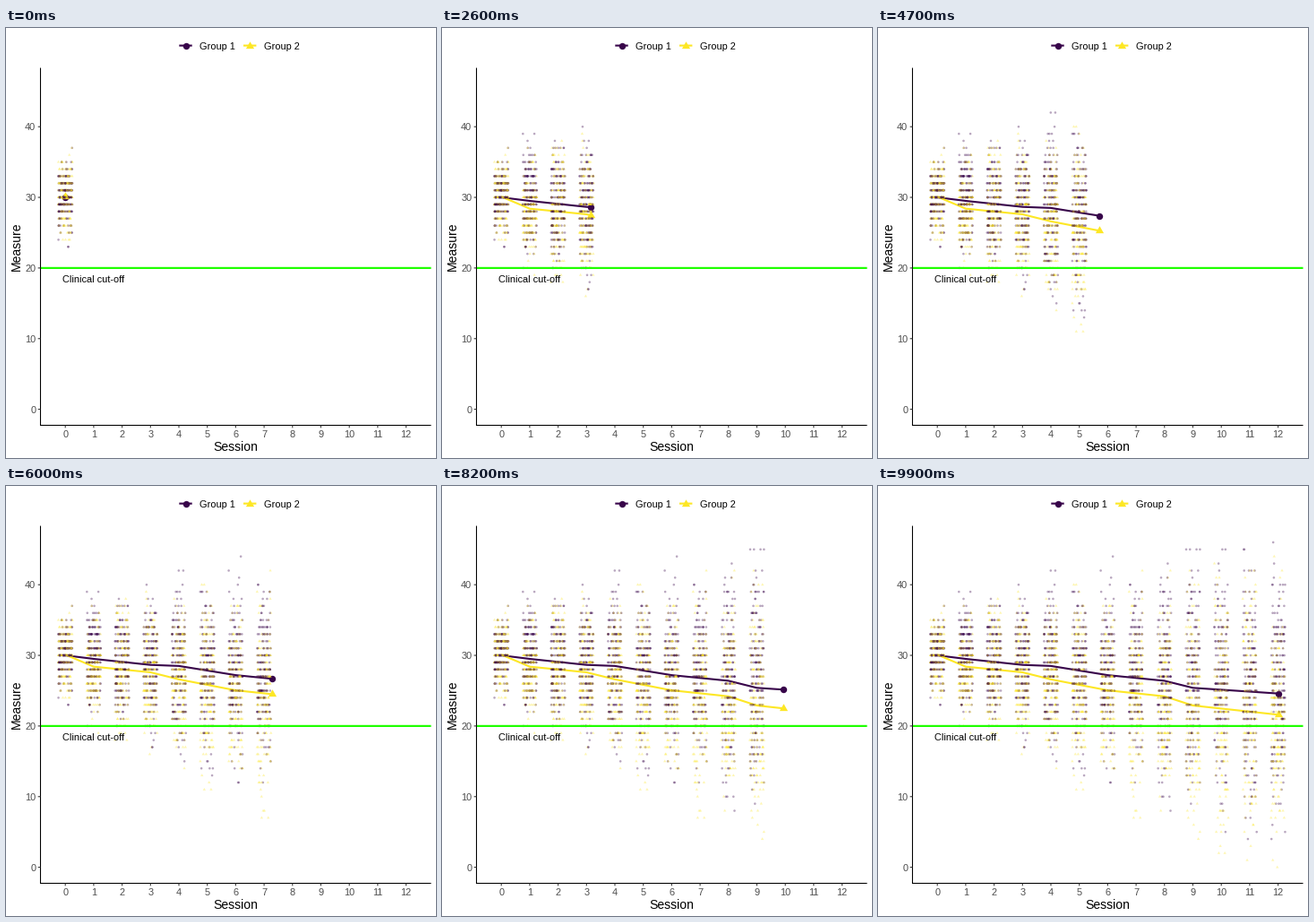
Write a matplotlib script that moves like this. It is 480 px wide and 480 px high and loops after 10000 ms.

```python
import matplotlib.pyplot as plt
import numpy as np
from matplotlib.animation import FuncAnimation
from matplotlib.colors import to_rgba
from matplotlib.path import Path
from matplotlib.transforms import Affine2D

FRAMES, INTERVAL = 100, 100
PEOPLE = 200  # per group
PT = 0.75  # points per pixel at 96 dpi
PURPLE, YELLOW, GREEN = "#38054a", "#fde725", "#1fff00"
INK, GREY = "black", "#4d4d4d"
LEFT, RIGHT, TOP, BOTTOM = 38.5, 474.5, 44.5, 443.5
SESSIONS = np.arange(13)
TRIANGLE = (3, 0, 0)

# Sessions where the trends bend, and the group means there
BENDS = [0, 1, 3, 4, 6, 8, 9, 12]
MEAN1 = [30.0, 29.5, 28.65, 28.5, 27.2, 26.4, 25.4, 24.6]
MEAN2 = [30.1, 28.4, 27.6, 26.6, 25.05, 24.2, 22.9, 21.6]


def px(session):
    return 66.2 + 31.7 * np.asarray(session)


def py(value):
    return 425.6 - 7.885 * np.asarray(value)


fig = plt.figure(figsize=(5, 5), dpi=96, facecolor="white")
ax = fig.add_axes([0, 0, 1, 1])
ax.set(xlim=(0, 480), ylim=(480, 0))
ax.axis("off")


def label(x, y, text, size=11, color=INK, ha="center", **kw):
    ax.text(x, y, text, fontsize=size * PT, color=color, ha=ha, va="baseline",
            family="Liberation Sans", zorder=8, **kw)


def stroke(xs, ys, color=INK, width=1.07, z=6):
    return ax.plot(xs, ys, color=color, lw=width * PT, zorder=z, snap=False,
                   solid_capstyle="butt")[0]


def marker(x, y, shape, color, z=3):
    size = 7.4 if shape == "o" else 10.6
    return ax.plot([x], [y], marker=shape, color=color, ms=size * PT, mew=0,
                   snap=False, zorder=z)[0]


def draw_axes():
    stroke([LEFT, LEFT], [TOP, BOTTOM + 0.5])
    stroke([LEFT - 0.5, RIGHT], [BOTTOM, BOTTOM])
    for v in range(0, 41, 10):
        stroke([LEFT - 2.8, LEFT], [py(v)] * 2, "#333333")
        label(33.4, py(v) + 4, str(v), color=GREY, ha="right")
    for s in SESSIONS:
        stroke([px(s)] * 2, [BOTTOM, BOTTOM + 2.8], "#333333")
        label(px(s), 457.3, str(s), color=GREY)
    label((LEFT + RIGHT) / 2, 471.5, "Session", 14)
    label(15.5, (TOP + BOTTOM) / 2 - 0.5, "Measure", 14, rotation=90,
          rotation_mode="anchor")


def draw_legend():
    keys = [(200.5, "o", PURPLE, "Group 1"), (272.2, TRIANGLE, YELLOW, "Group 2")]
    for x, shape, color, name in keys:
        stroke([x - 7.2, x + 7.2], [19.6, 19.6], color, 2.1)
        marker(x, 19.6, shape, color, 7)
        label(x + 15.6, 24, name, ha="left")


def draw_cutoff():
    stroke([LEFT, RIGHT], [py(20)] * 2, GREEN, 2.2, 5)
    label(98, 284, "Clinical cut-off")


def make_cloud(s, rng):
    """Scores of both groups, interleaved: a dot, then a triangle, and so on."""
    means = [np.interp(s, BENDS, m) for m in (MEAN1, MEAN2)]
    spread = np.sqrt(6.3 + 4.6 * s)
    z = rng.normal(size=(PEOPLE, 2)).clip(-2.8, 2.8)
    values = np.rint(means + spread * z).ravel()
    xs = px(s + rng.uniform(-0.25, 0.25, values.size))
    cloud = ax.scatter(xs, py(values), s=1, linewidths=0, zorder=4)
    shapes = ((Path.unit_circle(), 1.3), (Path.unit_regular_polygon(3), 1.9))
    cloud.set_paths([p.transformed(Affine2D().scale(r * PT)) for p, r in shapes])
    cloud.set_facecolor([to_rgba(c, 0.35) for c in (PURPLE, YELLOW)])
    return cloud


draw_axes()
draw_legend()
draw_cutoff()
rng = np.random.default_rng(12)
clouds = [make_cloud(s, rng) for s in SESSIONS]
trends = [(mean, stroke([], [], color, 2.1, 2), marker(0, 0, shape, color))
          for mean, color, shape in ((MEAN1, PURPLE, "o"), (MEAN2, YELLOW, TRIANGLE))]


def update(frame):
    t = 12 * frame / (FRAMES - 1)
    for s, cloud in zip(SESSIONS, clouds):
        cloud.set_visible(s <= t + 1e-9)
    path = np.append(SESSIONS[SESSIONS < t], t)
    for mean, line, tip in trends:
        y = py(np.interp(path, BENDS, mean))
        line.set_data(px(path), y)
        tip.set_data([px(t)], [y[-1]])
    return []


anim = FuncAnimation(fig, update, frames=FRAMES, interval=INTERVAL,
                     repeat=True, repeat_delay=0, blit=False)
plt.show()
```
